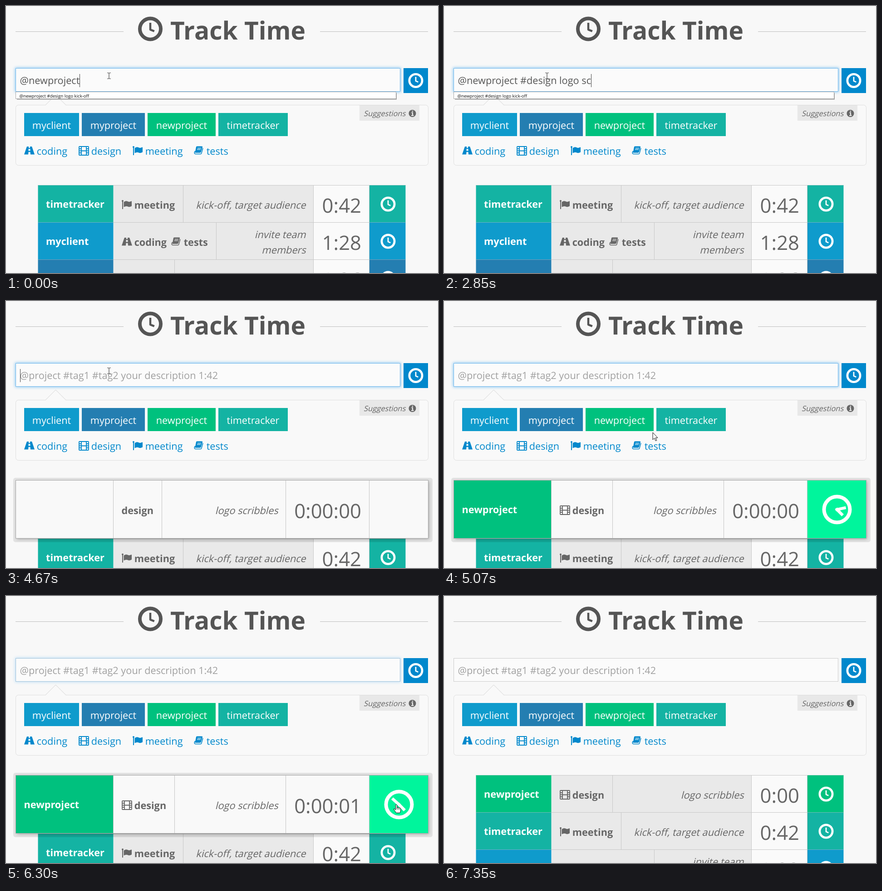
Recreate the animation shown at these times as an HTML page. Size 952 by 589 pixels, loop 7880 ms.

```html
<!DOCTYPE html>
<html lang="en">
<head>
<meta charset="utf-8">
<title>Track Time</title>
<style>
  html, body { margin: 0; width: 100%; height: 100%; overflow: hidden; background: #f8f8f8; }
  svg { display: block; width: 952px; height: 589px; }
  text { font: 21.7px "Open Sans", sans-serif; text-rendering: geometricPrecision; white-space: pre; }
</style>
</head>
<body>
<svg id="stage" viewBox="0 0 952 589"></svg>
<script>
const LOOP = 7880;
const stage = document.getElementById('stage');
const GREY = '#666', LINK = '#0088cc', PAPER = '#f9f9f9';
const COLORS = { myclient: '#0f9bcc', myproject: '#247eb1', newproject: '#00c17e', timetracker: '#14b3a3' };

// Typing: [first time, last time, prefix, endings]
const TYPING = [
  [0, 0, '@newproject', ['']],
  [120, 380, '@newproject', [' ', ' #', ' #d']],
  [660, 1650, '@newproject #d', ['e', 'es', 'esi', 'esig', 'esign', 'esign ', 'esign lo', 'esign loc']],
  [2210, 3000, '@newproject #design ', ['lo', 'log', 'logo', 'logo s', 'logo sc', 'logo scr']],
  [3560, 4110, '@newproject #design logo scr', ['i', 'ib', 'ibb', 'ibbl', 'ibbles']]
].flatMap(([start, end, prefix, endings]) => endings.map((s, i) =>
  [Math.round(start + (end - start) * i / Math.max(1, endings.length - 1)), prefix + s]));

const SUBMIT = 4670, COLORED = 5070, SECOND = 5760, BLUR = 6180, STOPPED = 6550, GONE = 7350;
const STEPS = [...TYPING.map(k => k[0]), SUBMIT, COLORED, 5220, 5370, 5490, 5630, SECOND, 5900, 6030,
  BLUR, 6300, 6420, STOPPED, 6680, 6810, 6945, 7080, 7230, GONE];

// Pointer path: [time, x, y]
const POINTER = [[COLORED, 460, 290], [5220, 720, 432], [5370, 815, 481], [SECOND, 860, 460],
  [6420, 860, 460], [STOPPED, 863, 468], [6810, 895, 505], [7080, 932, 553], [7230, 939, 570], [GONE, 944, 589]];

const rect = (x, y, w, h, fill, extra = '') =>
  `<rect x="${x}" y="${y}" width="${w}" height="${h}" fill="${fill}" ${extra}/>`;
const line = (d, color, extra = '') => `<path d="${d}" fill="none" stroke="${color}" ${extra}/>`;
const text = (x, y, s, fill, style = '', anchor = 'start') =>
  `<text x="${x}" y="${y}" fill="${fill}" style="${style}" text-anchor="${anchor}">${s}</text>`;
const slanted = (x, y, s, style = '', anchor = 'end') =>
  `<g transform="translate(${x} ${y}) skewX(-14)">${text(0, 0, s, GREY, style, anchor)}</g>`;
const bold = 'font-weight:700';
const timer = 'font-size:43.6px';

const clock = (x, y, radius, color) =>
  `<g transform="translate(${x} ${y}) scale(${radius / 12})" fill="none" stroke="${color}">
    <circle r="10.25" stroke-width="3.5"/>
    <path d="M0-6V.7L3.9 2.3" stroke-width="2" stroke-linejoin="round"/></g>`;

const ICONS = {
  coding: c => `<path fill="${c}" fill-rule="evenodd" d="M6 1h4l-.2 3h3.4L13 1h4l6 17.5h-9l-.5-5.5h-4L9 18.5H0z
    M9.7 6l-.4 4.5h4.4L13.3 6z"/>`,
  design: c => line('M2 1h19q1 0 1 1v17q0 1-1 1H2q-1 0-1-1V2q0-1 1-1zM6 1v19M17 1v19M6 10.5h11M1 6h5M1 10.5h5M1 15h5M17 6h5M17 10.5h5M17 15h5',
    c, 'stroke-width="1.8"'),
  meeting: c => `<path fill="${c}" d="M0 2a2 2 0 0 1 4 0q0 1-1 1.7V20H1V3.7Q0 3 0 2z
    M4.5 4.5Q9 1 13 3t8-.5q1-.4 1 .7v9.5q0 .6-.6 1-4.4 2.5-8 .7t-8.9 1.2z"/>`,
  tests: c => `<path fill="${c}" fill-rule="evenodd" d="M6.5.5H18q1.5 0 1 1.8l-3.3 11q-.4 1.4-2 1.4H2.5L5 2q.3-1.5 1.5-1.5z
    M8 4l-.4 1.3h8L16 4zM7.2 7l-.4 1.3h8l.4-1.3z"/>`
    + line('M2.5 11q-3 5.5.8 6.5H15q1.2 0 1.7-1.5L20 4.5', c, 'stroke-width="1.6"')
};
const icon = (name, x, baseline, color) => `<g transform="translate(${x} ${baseline - 19})">${ICONS[name](color)}</g>`;
const tag = (name, x, baseline, color, style) =>
  icon(name, x, baseline, color) + text(x + 27.7, baseline, name, color, style);

const ROWS = {
  newproject: { tags: [['design', 255]], split: 372, notes: ['logo scribbles'], time: '0:00' },
  timetracker: { tags: [['meeting', 255]], split: 391, notes: ['kick-off, target audience'], time: '0:42' },
  myclient: { tags: [['coding', 255], ['tests', 364]], split: 464, notes: ['invite team', 'members'], time: '1:28' },
  myproject: { tags: [['design', 255]], split: 372, notes: ['wireframes'], time: '1:36' }
};

function row(name, y) {
  const { tags, split, notes, time } = ROWS[name], color = COLORS[name];
  const noteTop = notes.length > 1 ? 35 : 52;
  return rect(237, y, 441, 82, '#e9e9e9') + rect(678, y, 123, 82, '#fafafa')
    + line(`M70 ${y + .5}H881M${split - .5} ${y}v82M677.5 ${y}v82M800.5 ${y}v82`, '#c8c8c8')
    + rect(70.5, y + .5, 166, 82, color) + rect(801, y + .5, 79.5, 82, color)
    + text(88, y + 50, name, '#fff', bold)
    + tags.map(([label, x]) => tag(label, x, y + 52, GREY, bold)).join('')
    + notes.map((s, i) => slanted(660.5, y + noteTop + 34 * i, s)).join('')
    + text(783, y + 61, time, GREY, timer, 'end')
    + clock(842, y + 42, 16.5, '#fff');
}

function activeRow(t) {
  const colored = t >= COLORED, split = colored ? 371.5 : 343.5;
  const minute = 135 + (t - 5370) * .19;
  const hand = (angle, length) => line(`M0 3V${-length}`, '#fff', `stroke-width="6.5" transform="translate(866 460) rotate(${angle})"`);
  return rect(16, 390, 924, 142, '#000', 'rx="5" opacity=".09"')
    + rect(24, 398, 908, 127, '#000', 'opacity=".28" filter="url(#soft)"')
    + rect(21, 395, 910, 129, PAPER)
    + (colored ? rect(21, 395, 216, 129, COLORS.newproject) + text(39.5, 468, 'newproject', '#fff', bold)
        + rect(801, 395, 129, 129, '#00f59c')
        + '<circle cx="866" cy="460" r="28.5" fill="none" stroke="#fff" stroke-width="8"/>'
        + hand(135, 18) + hand(minute, 20)
        + tag('design', 255, 470, GREY, bold)
      : text(254.5, 470, 'design', GREY, bold))
    + line(`M236.5 395v129M${split} 395v129M616.5 395v129M800.5 395v129`, '#c4c4c4')
    + rect(21.5, 395.5, 909, 128, 'none', 'stroke="#a8a8a8"')
    + slanted(599.5, 470, 'logo scribbles')
    + text(783, 479, t < SECOND ? '0:00:00' : '0:00:01', GREY, timer, 'end');
}

function header() {
  return line('M21 56.5H259M692 56.5H930', '#bdbdbd') + clock(318, 50.5, 27, '#555')
    + text(362, 74, 'Track Time', '#555', bold + ';font-size:55px');
}

function entry(t) {
  const glow = t < BLUR ? 1 : Math.max(0, 1 - (t - 6060) / 480);
  const typed = t < SUBMIT ? TYPING.findLast(k => k[0] <= t)[1] : '';
  const hinted = t < 1650 || (t >= 2210 && t < 3000);
  return rect(20, 136, 850, 54, '#5cb3f0', `opacity="${.7 * glow}" filter="url(#soft)"`)
    + rect(21.5, 137.5, 847, 51, '#fbfbfb', 'stroke="#ccc"')
    + rect(21.5, 137.5, 847, 51, 'none', `stroke="#74b9ec" opacity="${glow}"`)
    + `<g id="typed">${text(30.5, 172, typed || '@project #tag1 #tag2 your description 1:42', typed ? '#555' : '#a0a0a0')}</g>`
    + (t < COLORED ? `<path id="caret" data-empty="${typed ? '' : 1}" d="M0 150v29" stroke="#444"/>` : '')
    + rect(876, 137, 54, 55, LINK) + clock(903, 164.5, 16.5, '#fff')
    + (hinted ? rect(24, 192, 837, 14.5, '#a0a0a0') + rect(21.5, 189.5, 838, 15, '#fff', 'stroke="#aaa"')
        + text(29.5, 202, '@newproject #design logo kick-off', '#111', 'font-size:9.65px') : '');
}

function suggestions() {
  const buttons = [['myclient', 40, 121], ['myproject', 167, 139], ['newproject', 312, 150], ['timetracker', 468, 153]];
  const tags = [['coding', 40], ['design', 160], ['meeting', 279], ['tests', 414]];
  return rect(21.5, 218.5, 909, 133, PAPER, 'rx="6" stroke="#dedede"')
    + `<path d="M87 218.5L109.5 196L132 218.5" fill="${PAPER}" stroke="#d4d4d4"/>` + line('M88 218.5H131', PAPER)
    + rect(779, 219, 132, 34, '#e8e8e8') + slanted(788, 243, 'Suggestions', 'font-size:16.5px', 'start')
    + `<circle cx="895.5" cy="237" r="8" fill="${GREY}"/>`
    + line('M895.8 231v2.6M893.5 235.5h2.5v6M893 241.5h5.5', '#eee', 'stroke-width="2"')
    + buttons.map(([name, x, w]) => rect(x, 236, w, 51, COLORS[name]) + text(x + w / 2, 270.5, name, '#fff', '', 'middle')).join('')
    + tags.map(([name, x]) => tag(name, x, 328, LINK)).join('');
}

function pointer(t) {
  if (t >= GONE) return '';
  if (t < COLORED) return line('M223.5 147.5h2.5l1 1 1-1h2.5M227 148v12M223.5 160.5h2.5l1-1 1 1h2.5', '#222');
  const i = POINTER.findLastIndex(k => k[0] <= t);
  const [t0, x0, y0] = POINTER[i], [t1, x1, y1] = POINTER[i + 1];
  const p = (t - t0) / (t1 - t0), x = x0 + (x1 - x0) * p, y = y0 + (y1 - y0) * p;
  const shape = t >= 5370 && t < STOPPED
    ? 'M-1.5 1Q0-1 1.5 1V7q1.5-1.5 3 0 1.5-1 3 .7 1.8-.7 2.3 1.5V13q0 3-2 5.5H0Q-3 14-5.5 11q-.3-2 1.5-1.6L-1.5 12zM1.5 7v4M4.5 7.5V11M7.5 8.5V11'
    : 'M0 0V16l3.7-3.5L6.3 18.5l2.5-1L6.2 11.8H11z';
  return `<path d="${shape}" transform="translate(${x} ${y})" fill="#fff" stroke="#111" stroke-linejoin="round"/>`;
}

function list(t) {
  const running = t >= SUBMIT && t < STOPPED;
  const names = ['timetracker', 'myclient', 'myproject'];
  if (t >= STOPPED) names.unshift('newproject');
  const top = running ? 524 : 395;
  return names.map((name, i) => row(name, top + 82 * i)).join('') + (running ? activeRow(t) : '');
}

function draw(t) {
  stage.innerHTML = '<defs><filter id="soft" x="-5%" y="-30%" width="110%" height="160%"><feGaussianBlur stdDeviation="3"/></filter></defs>'
    + header() + suggestions() + entry(t) + list(t) + pointer(t);
  const caret = document.getElementById('caret');
  if (caret) {
    const width = caret.dataset.empty ? 0 : document.querySelector('#typed text').getComputedTextLength();
    caret.setAttribute('transform', `translate(${Math.round(30.5 + width) + .5} 0)`);
  }
}

let shown = -1;
function tick() {
  const now = performance.now() % LOOP;
  const step = STEPS.findLast(s => s <= now);
  if (step !== shown) draw(shown = step);
  requestAnimationFrame(tick);
}
tick();
</script>
</body>
</html>
```
